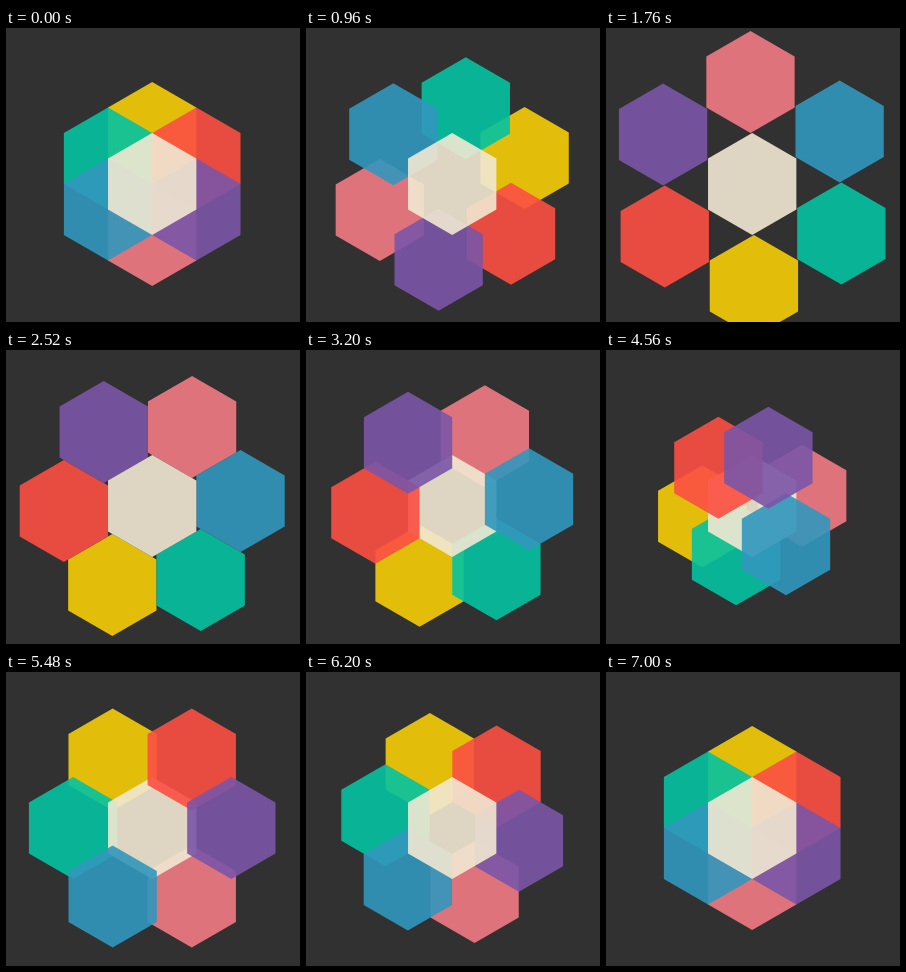
These frames come from a looping animation (294x294 px, 7.04 s). An HTML page:

```html
<!DOCTYPE html>
<html lang="en">
<head>
<meta charset="utf-8">
<title>Hexagon ring</title>
<style>
  @property --spin { syntax: "<angle>"; inherits: true; initial-value: 0deg; }
  @property --x { syntax: "<length>"; inherits: true; initial-value: 51px; }
  @property --y { syntax: "<length>"; inherits: true; initial-value: 0px; }

  html, body { margin: 0; width: 100%; height: 100%; overflow: hidden; background: #303130; }

  svg {
    display: block;
    width: 100vw;
    height: 100vh;
    animation: spin 7040ms infinite, slide 7040ms infinite;
  }

  use { opacity: .9; }

  /* Each tile sits on its own arm of the ring but stays upright. */
  .tile {
    --angle: calc(var(--spin) + var(--i) * 60deg - 90deg);
    transform-origin: 0 0;
    transform: rotate(var(--angle)) translate(var(--x), var(--y)) rotate(calc(-1 * var(--angle)));
  }

  .yellow { --i: 0; fill: rgb(246 206 7); }
  .red    { --i: 1; fill: rgb(252 78 66); }
  .purple { --i: 2; fill: rgb(122 86 167); }
  .pink   { --i: 3; fill: rgb(241 122 132); }
  .blue   { --i: 4; fill: rgb(49 151 189); }
  .green  { --i: 5; fill: rgb(5 195 161); }

  /* The centre changes layer while nothing overlaps it. */
  .core { fill: rgb(241 232 210); animation: 7040ms step-end infinite; }
  .middle { animation-name: middle; }
  .top { animation-name: top; }

  @keyframes spin {
    0% { --spin: 0deg; animation-timing-function: cubic-bezier(.9, 0, .1, 1); }
    28% { --spin: 180deg; }
    56.8% { --spin: 180deg; animation-timing-function: cubic-bezier(.9, 0, .1, 1); }
    72.7%, 100% { --spin: 330deg; }
  }

  @keyframes slide {
    0% { --x: 51px; --y: 0px; animation-timing-function: cubic-bezier(.95, 0, .1, 1); }
    26.28% { --x: 102px; --y: 0px; animation-timing-function: cubic-bezier(.22, .15, .22, 1); }
    42.05%, 42.9% { --x: 76.5px; --y: 44.17px; animation-timing-function: ease; }
    56.8%, 73% { --x: 51px; --y: 0px; animation-timing-function: ease; }
    83.95%, 84.05% { --x: 89px; --y: 0px; animation-timing-function: ease; }
    97.87%, 100% { --x: 44.17px; --y: 25.5px; }
  }

  @keyframes middle {
    0%, 84% { visibility: hidden; }
    42.5% { visibility: visible; }
    100% { visibility: hidden; }
  }

  @keyframes top {
    0%, 84% { visibility: visible; }
    42.5% { visibility: hidden; }
    100% { visibility: visible; }
  }
</style>
</head>
<body>
<svg viewBox="-146.2 -156 294 294">
  <defs>
    <polygon id="hex" points="0,-51 44.17,-25.5 44.17,25.5 0,51 -44.17,25.5 -44.17,-25.5"/>
  </defs>
  <use href="#hex" class="tile yellow"/>
  <use href="#hex" class="tile pink"/>
  <use href="#hex" class="tile green"/>
  <use href="#hex" class="core middle"/>
  <use href="#hex" class="tile red"/>
  <use href="#hex" class="tile blue"/>
  <use href="#hex" class="tile purple"/>
  <use href="#hex" class="core top"/>
</svg>
</body>
</html>
```
